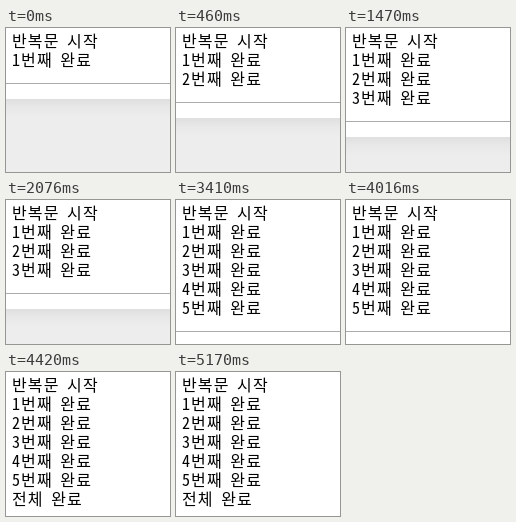
Recreate the animation shown at these times as an HTML page. Size 164 by 144 pixels, loop 5670 ms.

```html
<!DOCTYPE html>
<html lang="ko">
<head>
<meta charset="utf-8">
<title>반복문</title>
<style>
  html, body { margin: 0; width: 100%; height: 100%; overflow: hidden; background: #fff; }
  svg { display: block; width: 164px; height: 144px; }
  text {
    font: 16px "Noto Sans Mono CJK KR", "Noto Sans CJK KR", "Noto Sans CJK", monospace;
    letter-spacing: 1.1px;
    word-spacing: -1.5px;
    fill: #000;
  }
</style>
</head>
<body>
<svg viewBox="0 0 164 144">
  <defs>
    <linearGradient id="shade" x1="0" y1="0" x2="0" y2="1">
      <stop offset="0" stop-color="#dfdfdf"/>
      <stop offset=".45" stop-color="#e8e8e8"/>
      <stop offset="1" stop-color="#ededed"/>
    </linearGradient>
  </defs>
  <rect width="164" height="144" fill="#fff"/>
  <g id="edge">
    <rect y="55" width="164" height="1" fill="#ababab"/>
    <rect y="71" width="164" height="18" fill="url(#shade)"/>
    <rect y="89" width="164" height="80" fill="#ededed"/>
  </g>
  <g id="log"></g>
</svg>
<script>
  const LOOP = 5670;
  const STEPS = [0, 460, 1470, 2480, 3410, 4420];
  const ROW = 19;
  const lines = ["반복문 시작"];
  for (let i = 1; i <= 5; i++) lines.push(i + "번째 완료");
  lines.push("전체 완료");

  const edge = document.getElementById("edge");
  const log = document.getElementById("log");
  const rows = lines.map((line, i) => {
    const row = document.createElementNS("http://www.w3.org/2000/svg", "text");
    row.setAttribute("x", 6);
    row.setAttribute("y", 19 + i * ROW);
    row.textContent = line;
    return log.appendChild(row);
  });

  let shown = -1;
  function render(time) {
    const t = time % LOOP;
    const step = STEPS.filter(s => s <= t).length - 1;
    if (step === shown) return;
    shown = step;
    edge.setAttribute("transform", `translate(0 ${step * ROW})`);
    rows.forEach((row, i) => row.setAttribute("visibility", i < step + 2 ? "visible" : "hidden"));
  }

  const start = performance.now();
  function tick() {
    render(performance.now() - start);
    requestAnimationFrame(tick);
  }
  tick();
</script>
</body>
</html>
```
